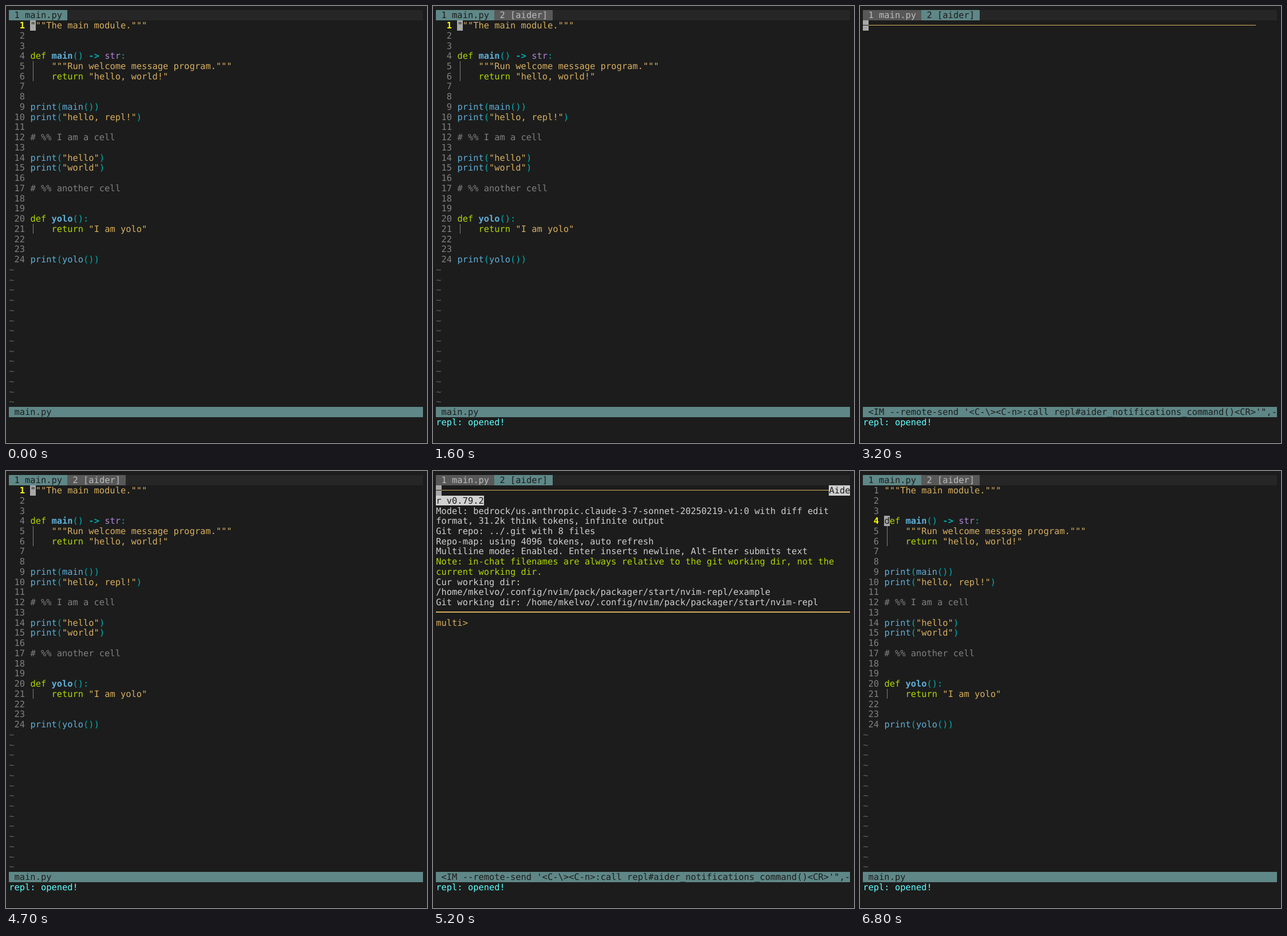
An HTML page that plays this animation: 735 px wide and 762 px high, repeating every 8000 ms.

```html
<!DOCTYPE html>
<html lang="en">
<head>
<meta charset="utf-8">
<title>Editor with REPL</title>
<style>
html, body { margin: 0; width: 100%; height: 100%; overflow: hidden; background: #1c1c1c; }
svg { display: block; width: 735px; height: 762px; }
text {
  font: 15.4px "DejaVu Sans Mono", monospace;
  text-rendering: geometricPrecision;
  white-space: pre;
  fill: #d0d0d0;
}
rect { shape-rendering: crispEdges; }
.b { font-weight: bold; }
text.dark { fill: #1c1c1c; }
text.tab { fill: #bcbcbc; }
text.num, text.comment { fill: #808080; }
text.cur { fill: #ffff00; }
text.tilde { fill: #626262; }
text.key { fill: #afd700; }
text.str { fill: #d7af5f; }
text.op { fill: #00afaf; }
text.type { fill: #af87d7; }
text.fn { fill: #5fafd7; }
text.msg { fill: #5fffff; }

.edit, .term, .out, .cmd, .type-pos, .opened, .block, .l1, .l2, .l3, .l4 {
  animation: 8s step-end infinite;
}
.edit { animation-name: edit; }
.term { animation-name: term; }
.out { animation-name: out; }
.cmd { animation-name: cmd; }
.type-pos { animation-name: type; }
.opened { animation-name: opened; }
.block { animation-name: block; }
.l1 { animation-name: l1; }
.l2 { animation-name: l2; }
.l3 { animation-name: l3; }
.l4 { animation-name: l4; }
@keyframes edit { 0%, 58.75%, 71.25%, 100% { opacity: 1 } 40%, 65% { opacity: 0 } }
@keyframes term { 0%, 58.75%, 71.25%, 100% { opacity: 0 } 40%, 65% { opacity: 1 } }
@keyframes out { 0% { opacity: 0 } 46.25%, 100% { opacity: 1 } }
@keyframes cmd { 0%, 20%, 100% { opacity: 0 } 6.25% { opacity: 1 } }
@keyframes opened { 0% { opacity: 0 } 20%, 100% { opacity: 1 } }
@keyframes block { 0%, 20%, 100% { opacity: 1 } 6.25% { opacity: 0 } }
@keyframes l1 { 0% { opacity: 1 } 81.25%, 100% { opacity: 0 } }
@keyframes l2 { 0%, 83.75%, 100% { opacity: 0 } 81.25% { opacity: 1 } }
@keyframes l3 { 0%, 85%, 100% { opacity: 0 } 83.75% { opacity: 1 } }
@keyframes l4 { 0% { opacity: 0 } 85%, 100% { opacity: 1 } }
/* one column is 9.2715px */
@keyframes type {
  0% { transform: translate(9.27px, 0) }
  8.75% { transform: translate(18.54px, 0) }
  11.25% { transform: translate(37.09px, 0) }
  13.75% { transform: translate(46.36px, 0) }
  15%, 100% { transform: translate(55.63px, 0) }
}
</style>
</head>
<body>
<svg id="stage" viewBox="0 0 735 762"></svg>
<script>
const W = 9.2715, H = 17.74, X0 = 5.3, Y0 = 7.2, COLS = 78;
const BG = '#1c1c1c', BAR = '#262626', TEAL = '#5f8787', GREY = '#585858';
const CURSOR = '#a8a8a8', LIGHT = '#d0d0d0', GOLD = '#d7af5f', RULE = '#808080';
const x = col => X0 + col * W;
const y = row => Y0 + row * H;

function add(parent, tag, attrs) {
  const el = document.createElementNS('http://www.w3.org/2000/svg', tag);
  for (const key in attrs) el.setAttribute(key, attrs[key]);
  return parent.appendChild(el);
}
const group = (parent, cls) => add(parent, 'g', { class: cls });
const rect = (parent, left, top, width, height, fill) =>
  add(parent, 'rect', { x: left, y: top, width, height, fill });
const cells = (parent, row, col, n, fill) => rect(parent, x(col), y(row), n * W, H, fill);
const rule = (parent, row, col, n, fill) => rect(parent, x(col), y(row) + 7.6, n * W, 1.5, fill);
function write(parent, row, col, str, cls = '') {
  add(parent, 'text', { x: x(col), y: y(row) + 14.1, class: cls }).textContent = str;
}

const source = `"""The main module."""


def main() -> str:
    """Run welcome message program."""
    return "hello, world!"


print(main())
print("hello, repl!")

# %% I am a cell

print("hello")
print("world")

# %% another cell


def yolo():
    return "I am yolo"


print(yolo())`.split('\n');

const token = /(?<str>"""[^"]*"""|"[^"]*")|(?<comment>#.*)|(?<key>\b(?:def|return)\b)|(?<type>\bstr\b)|(?<op>->|[():]+)|(?<fn>\w+)/g;

function writeCode(parent, row, line) {
  for (const m of line.matchAll(token)) {
    const kind = Object.keys(m.groups).find(k => m.groups[k]);
    const bold = m[0] === '->' || (kind === 'fn' && line.startsWith('def'));
    write(parent, row, 4 + m.index, m[0], kind + (bold ? ' b' : ''));
  }
  if (line.startsWith('    ')) rect(parent, x(4.5) - 0.5, y(row), 1.4, H, RULE);
}

function tabs(parent, first) {
  cells(parent, 0, 0, 11, first ? TEAL : GREY);
  write(parent, 0, 1, '1 main.py', first ? 'dark' : 'tab');
  const second = group(parent, 'opened');
  cells(second, 0, 11, 11, first ? GREY : TEAL);
  write(second, 0, 12, '2 [aider]', first ? 'tab' : 'dark');
}

// Highlighted line number and block cursor on one line.
function mark(parent, row) {
  const line = group(parent, 'l' + row);
  cells(line, row, 2, 1, BG);
  write(line, row, 3 - String(row).length, row, 'cur b');
  const block = group(line, row === 1 ? 'block' : '');
  cells(block, row, 4, 1, CURSOR);
  write(block, row, 4, source[row - 1].charAt(0), 'dark');
}

const stage = document.getElementById('stage');
rect(stage, 0, 0, 735, 762, BG);
cells(stage, 0, 0, COLS, BAR);
cells(stage, 39, 0, COLS, TEAL);
rect(stage, 0, 761, 735, 1, '#120d0d');

const edit = group(stage, 'edit');
tabs(edit, true);
source.forEach((line, i) => {
  const n = String(i + 1);
  write(edit, i + 1, 3 - n.length, n, 'num');
  writeCode(edit, i + 1, line);
});
for (let row = 25; row < 39; row++) write(edit, row, 0, '~', 'tilde');
for (let row = 1; row <= 4; row++) mark(edit, row);
write(edit, 39, 1, 'main.py', 'dark');

const term = group(stage, 'term');
tabs(term, false);
rule(term, 1, 0, 74, GOLD);
cells(term, 1, 0, 1, CURSOR);
rule(term, 1, 0, 1, BG);
write(term, 39, 1, `<IM --remote-send '<C-\\><C-n>:call repl#aider_notifications_command()<CR>'",-`, 'dark');

const out = group(term, 'out');
cells(out, 1, 74, 4, LIGHT);
write(out, 1, 74, 'Aide', 'dark');
cells(out, 2, 0, 9, LIGHT);
write(out, 2, 0, 'r v0.79.2', 'dark');
[
  'Model: bedrock/us.anthropic.claude-3-7-sonnet-20250219-v1:0 with diff edit',
  'format, 31.2k think tokens, infinite output',
  'Git repo: ../.git with 8 files',
  'Repo-map: using 4096 tokens, auto refresh',
  'Multiline mode: Enabled. Enter inserts newline, Alt-Enter submits text',
  'Note: in-chat filenames are always relative to the git working dir, not the',
  'current working dir.',
  'Cur working dir:',
  '/home/mkelvo/.config/nvim/pack/packager/start/nvim-repl/example',
  'Git working dir: /home/mkelvo/.config/nvim/pack/packager/start/nvim-repl'
].forEach((line, i) => write(out, i + 3, 0, line, i === 5 || i === 6 ? 'key' : ''));
rule(out, 13, 0, COLS, GOLD);
write(out, 14, 0, 'multi>', 'str');

// The cover travels with the cursor and hides what is not typed yet.
const cmd = group(stage, 'cmd');
write(cmd, 40, 0, ':Aider');
const typing = group(cmd, 'type-pos');
cells(typing, 40, 0, 8, BG);
cells(typing, 40, 0, 1, CURSOR);

write(group(stage, 'opened'), 40, 0, 'repl: opened!', 'msg');
</script>
</body>
</html>
```
